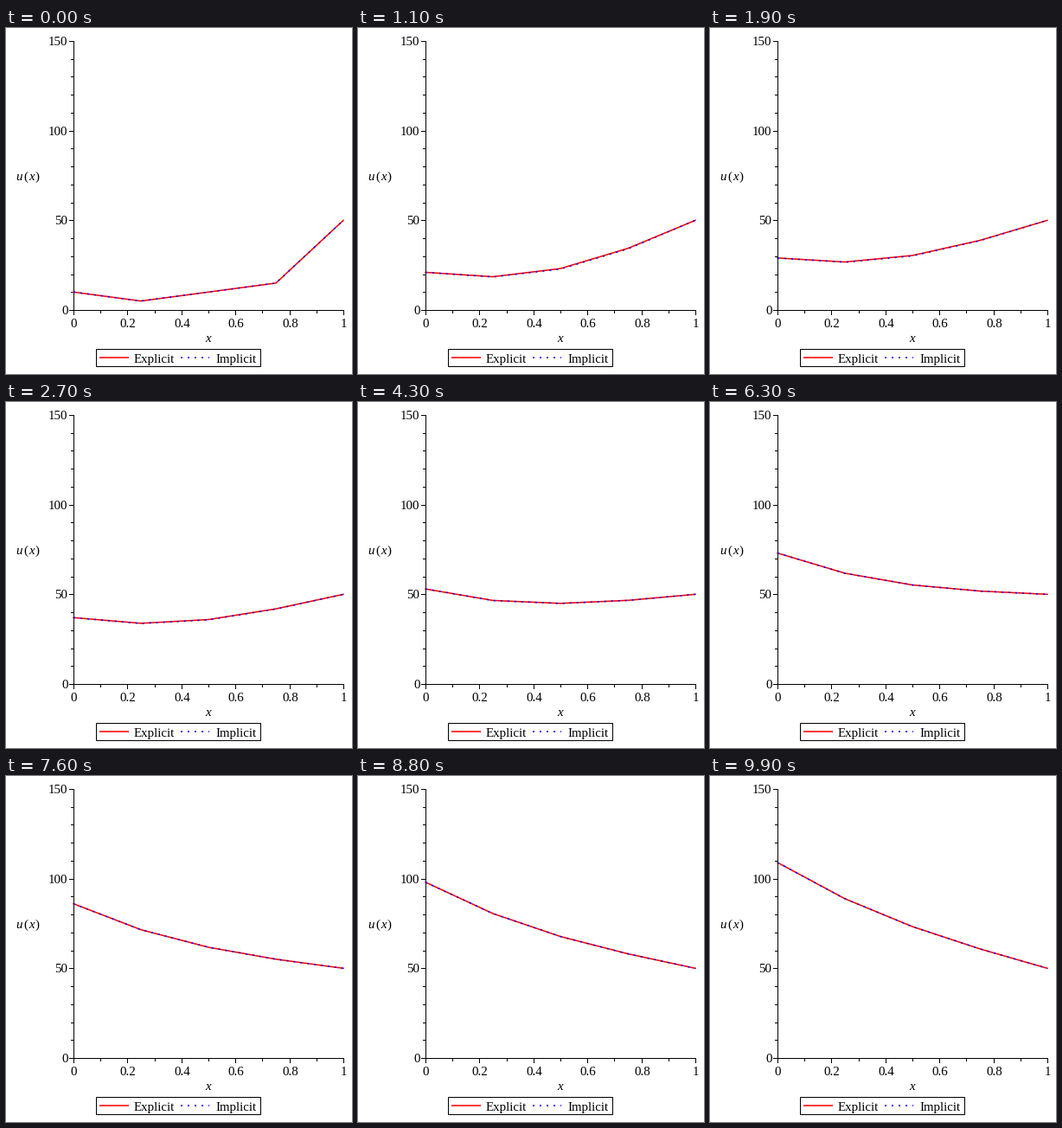
A matplotlib script that plays this animation: 400x400 px, repeating every 10000 ms.

```python
import matplotlib.pyplot as plt
import numpy as np
from matplotlib.animation import FuncAnimation
from matplotlib.patches import Rectangle

FRAMES, SUB = 100, 2           # solver steps per frame
R = 0.16 / SUB                 # diffusion number per solver step
X0, X1, Y0, Y1 = 78, 390, 326, 15
PX = 0.72                      # points per pixel at 100 dpi

plt.rcParams["font.family"] = "Liberation Serif"
plt.rcParams["text.hinting"] = "native"


def px(x):
    return X0 + (X1 - X0) * np.asarray(x)


def py(u):
    return Y0 + (Y1 - Y0) * np.asarray(u) / 150


def solve():
    """Heat equation on four cells; the left end warms by 1 each frame."""
    steps = (FRAMES - 1) * SUB + 1
    exp = np.zeros((steps, 5))
    exp[0] = 10, 5, 10, 15, 50
    imp = exp.copy()
    system = np.eye(5)
    for i in (1, 2, 3):
        system[i, i - 1:i + 2] = -R, 1 + 2 * R, -R
    for n in range(1, steps):
        left = 10 + n / SUB
        e = exp[n - 1]
        exp[n] = e
        exp[n, 1:-1] += R * (e[:-2] - 2 * e[1:-1] + e[2:])
        exp[n, 0] = left
        rhs = imp[n - 1].copy()
        rhs[0] = left
        imp[n] = np.linalg.solve(system, rhs)
    return exp[::SUB], imp[::SUB]


fig = plt.figure(figsize=(4, 4), dpi=100, facecolor="white")
ax = fig.add_axes([0, 0, 1, 1])
ax.set(xlim=(0, 400), ylim=(400, 0))
ax.axis("off")


def rule(xs, ys):
    ax.plot(xs, ys, color="black", lw=PX, solid_capstyle="projecting")


def label(x, y, s, ha="left", style="normal"):
    ax.text(x, y, s, ha=ha, va="baseline", fontsize=15 * PX, style=style)


def red_line(xs, ys, cap="projecting"):
    return ax.plot(xs, ys, color="red", lw=1.55 * PX, zorder=3,
                   solid_capstyle=cap, solid_joinstyle="round")[0]


def blue_dots(xs, ys):
    return ax.plot(xs, ys, color="blue", lw=1.55 * PX, zorder=4,
                   dashes=(1.29, 3.87), dash_capstyle="butt")[0]


# Axes and ticks
rule([X0, X0], [Y1, Y0 + 5])
rule([X0, X1], [Y0, Y0])
for k in range(16):
    y = round(float(py(10 * k)))
    rule([X0 - (5 if k % 5 == 0 else 3), X0], [y, y])
    if k % 5 == 0:
        label(71.5, y + 5, str(10 * k), "right")
for k in range(11):
    x = round(float(px(k / 10)))
    rule([x, x], [Y0, Y0 + (5 if k % 2 == 0 else 3)])
    if k % 2 == 0:
        label(x + 0.5, 346, f"{k / 10:g}", "center")

label(230, 363, "x", style="italic")
for x, s, style in ((11, "u", "italic"), (20.5, "(", "normal"),
                    (26, "x", "italic"), (33.5, ")", "normal")):
    label(x, 176, s, style=style)

# Legend
ax.add_patch(Rectangle((104, 371), 190, 20, fill=False, lw=PX))
red_line([108, 142], [381, 381], "butt")
blue_dots([202, 235], [381, 381])
label(148, 387, "Explicit")
label(242, 387, "Implicit")

explicit, implicit = solve()
nodes = px(np.linspace(0, 1, 5))
red = red_line(nodes, py(explicit[0]))
blue = blue_dots(nodes, py(implicit[0]))


def draw(n):
    red.set_ydata(py(explicit[n]))
    blue.set_ydata(py(implicit[n]))
    return red, blue


anim = FuncAnimation(fig, draw, frames=FRAMES, interval=100,
                     repeat=True, repeat_delay=0)
plt.show()
```
